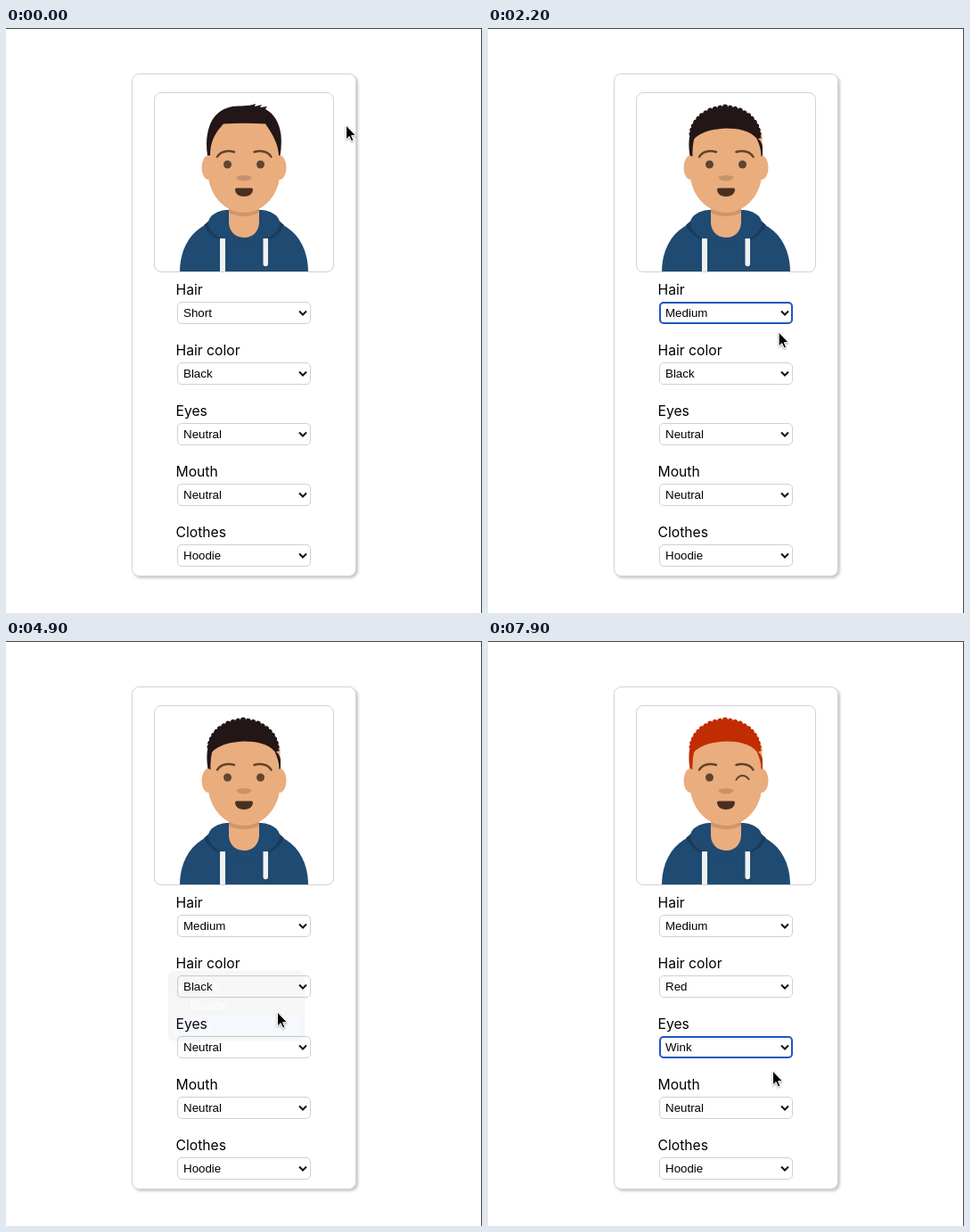
An HTML page for the animation above (8000 ms loop, 534 px wide and 656 px high).

```html
<!DOCTYPE html>
<html lang="en">
<head>
<meta charset="utf-8">
<title>Avatar editor</title>
<style>
  html, body { margin: 0; width: 100%; height: 100%; overflow: hidden; background: #fff; }
  svg { display: block; width: 534px; height: 656px; }
  .panel { fill: #fff; stroke: #d2d2d2; filter: drop-shadow(2px 2px 1.5px rgba(0, 0, 0, .22)); }
  .frame { fill: none; stroke: #d2d2d2; }
  .label { font: 15.7px Inter, "Open Sans", sans-serif; }
  .box { fill: #fff; stroke: #d0d0d0; }
  .ring { fill: none; stroke: #1f57c0; stroke-width: 2; }
  .value { font: 13.333px "Liberation Sans", Arial, sans-serif; }
  .chevron { fill: none; stroke: #111; stroke-width: 2; }
  .sheet { fill: #645f65; stroke: #2c292d; filter: drop-shadow(0 3px 5px rgba(0, 0, 0, .3)); }
  .rim { fill: none; stroke: #858086; }
  .hover { fill: #4a82ea; }
  .option { font: 500 13px Inter, "Open Sans", sans-serif; fill: #f0eef0; }
  .tick { fill: none; stroke: #f0eef0; stroke-width: 1.6; stroke-linecap: round; stroke-linejoin: round; }
  .skin { fill: #eaad7e; }
  .cloth { fill: #1f4a71; }
  .shade { fill: #193b5b; }
  .brow { fill: none; stroke: #60432b; stroke-width: 2.4; stroke-linecap: round; }
  .eye { fill: #5f4630; }
  #cursor { filter: drop-shadow(0 1px 1px rgba(0, 0, 0, .35)); }
</style>
</head>
<body>
<svg id="stage" viewBox="0 0 534 656">
  <defs><clipPath id="clip"><rect x="167" y="73" width="200" height="200" rx="7"/></clipPath></defs>
  <path d="M0 .5H534M533.5 0V656" stroke="#444" fill="none"/>
  <rect class="panel" x="141.5" y="51.5" width="251" height="563" rx="8"/>

  <g clip-path="url(#clip)">
    <path class="cloth" d="M195 274C195 245 209 225 232 217H302C325 225 339 245 339 274Z"/>
    <path class="shade" d="M222 221C227 232 238 239 250 240H284C296 239 307 232 312 221L304 214H230Z"/>
    <path class="cloth" d="M250 204C238 204 227 210 227 219C227 230 246 243 267 243S307 230 307 219C307 210 296 204 284 204Z"/>
    <path class="skin" d="M250 190H284V217C284 228 277 235 267 235S250 228 250 217Z"/>
    <path fill="#cd966d" d="M250 202H284V207C274 212.500 260 212.500 250 207Z"/>
    <path d="M240 236H246V274H240Z" fill="#f1f1f1"/>
    <path d="M288.500 236H294V264.500A2.750 2.750 0 0 1 288.500 264.500Z" fill="#f1f1f1"/>
    <ellipse class="skin" cx="227" cy="156.500" rx="7.500" ry="13.500"/>
    <ellipse class="skin" cx="307" cy="156.500" rx="7.500" ry="13.500"/>
    <path class="skin" d="M226.500 120C229 100 305 100 307.500 120V160C307.500 188 288 207 267 207S226.500 188 226.500 160Z"/>
    <path id="hair"/>
    <path class="brow" d="M237 144.500C240 139 248 136.500 256 139"/>
    <path class="brow" d="M297.500 144.500C294.500 139 286.500 136.500 278.500 139"/>
    <circle class="eye" cx="248.500" cy="153" r="4.500"/>
    <circle class="eye" id="eye" cx="285.500" cy="153" r="4.500"/>
    <path class="brow" id="wink" style="stroke-width:2" d="M278.500 155.500C282 149.500 289 149.500 292.500 155"/>
    <path fill="#c7926a" d="M258.500 167C262 164.800 272 164.800 275.500 167C274.500 173 259.500 173 258.500 167Z"/>
    <path fill="#49301f" d="M257 181Q257 179.500 258.500 179.500H275.500Q277 179.500 277 181C277 186 272.500 189 267 189S257 186 257 181Z"/>
  </g>
  <rect class="frame" x="166.500" y="72.500" width="201" height="201" rx="7.500"/>

  <g id="fields"></g>
  <g id="menu"></g>
  <path id="cursor" d="M.500 0V16L4.100 12.600L6.500 18L8.900 17L6.600 11.700H11.500Z" stroke="#fff" stroke-width="1"/>
</svg>
<script>
const LOOP = 8000, STEP = 100, ROW = 22;
const $ = id => document.getElementById(id);

function add(parent, tag, attrs, text) {
  const el = document.createElementNS('http://www.w3.org/2000/svg', tag);
  for (const k in attrs) el.setAttribute(k, attrs[k]);
  if (text) el.textContent = text;
  return parent.appendChild(el);
}

const fields = [
  ['Hair', 'Short'], ['Hair color', 'Black'], ['Eyes', 'Neutral'],
  ['Mouth', 'Neutral'], ['Clothes', 'Hoodie']
].map(([name, start], i) => {
  const g = add($('fields'), 'g', { transform: `translate(192 ${307 + 68 * i})` });
  add(g, 'text', { class: 'label', x: -1.5, y: -8.3 }, name);
  add(g, 'rect', { class: 'box', x: .5, y: .5, width: 149, height: 24, rx: 4.5 });
  const ring = add(g, 'rect', { class: 'ring', x: 1, y: 1, width: 148, height: 23, rx: 4 });
  const value = add(g, 'text', { class: 'value', x: 7, y: 17 }, start);
  add(g, 'path', { class: 'chevron', d: 'M137 10.500L141 14.500L145 10.500' });
  return { start, ring, value };
});

// Each menu opens over its field; the picked row blinks on click, then the menu fades.
const menus = [
  { options: ['Short', 'Medium', 'Long'], open: 800, click: 1800, pick: 1 },
  { options: ['Black', 'Blonde', 'Red'], open: 3500, click: 4600, pick: 2 },
  { options: ['Neutral', 'Close', 'Wink'], open: 6000, click: 7300, pick: 2 }
];
menus.forEach((m, i) => {
  m.top = 302 + 68 * i;
  m.g = add($('menu'), 'g', { transform: `translate(182 ${m.top})` });
  add(m.g, 'rect', { class: 'sheet', x: .5, y: .5, width: 152, height: 77, rx: 5.5 });
  add(m.g, 'rect', { class: 'rim', x: 1.5, y: 1.5, width: 150, height: 75, rx: 4.5 });
  m.hover = add(m.g, 'rect', { class: 'hover', x: 6, width: 141, height: ROW, rx: 4 });
  add(m.g, 'path', { class: 'tick', d: 'M11 18L14 21.500L19 13.500' });
  m.options.forEach((o, r) => add(m.g, 'text', { class: 'option', x: 24, y: 22 + ROW * r }, o));
});

// Pointer stops: time, x, y
const track = [
  [0, 381, 109], [100, 383, 114], [300, 392, 160], [500, 372, 250], [700, 331, 317],
  [1100, 331, 317], [1400, 307, 339], [2000, 307, 339], [2300, 335, 342], [2600, 368, 346],
  [2800, 376, 352], [3000, 357, 358], [3300, 328, 380], [3700, 326, 382], [4000, 319, 395],
  [4400, 309, 422], [4700, 309, 422], [4900, 304, 416], [5200, 330, 420], [5500, 344, 432],
  [5900, 328, 445], [6500, 328, 445], [7100, 316, 490], [7500, 316, 490], [7900, 319, 482]
];

function pointer(t) {
  const i = track.findIndex(p => p[0] > t);
  if (i < 0) return track[track.length - 1].slice(1);
  const [a, b] = [track[i - 1], track[i]];
  const k = (t - a[0]) / (b[0] - a[0]);
  return [a[1] + (b[1] - a[1]) * k, a[2] + (b[2] - a[2]) * k];
}

function curls() {
  let d = 'M229.500 144L226.500 143Q224.500 132 226 122';
  const n = 21;
  for (let i = 0; i <= n; i++) {
    const a = Math.PI * (1 + i / n);
    const x = 266 + 39.5 * Math.cos(a), y = 121 + 32.5 * Math.sin(a);
    d += `A3 3 0 0 1 ${x.toFixed(1)} ${y.toFixed(1)}`;
  }
  return d + 'L307 123L302 124.500C294 115 281 112.500 267 112.500C251 113 236 118 231 125Q229 134 229.500 144Z' +
    'M301 123Q307 126 308 133L308 143L306.500 144Q306.500 134 301 123Z';
}

const cuts = {
  Short: 'M229 143L226 143C224 130 225 118 229 108C233 98 240 92 250 89C259 86 270 89 280 85' +
    'L279 88L287 86L285 89L293 88L291 91C301 96 307 107 308.500 120Q309.500 132 307.500 143L306 143' +
    'C305.500 130 299 119 291 107.500Q267 106 244 107.500C234 118 229 128 229 143Z',
  Medium: curls()
};
const dyes = { Black: '#231616', Red: '#c22c02' };
const show = (el, on) => { el.style.display = on ? '' : 'none'; };

function draw(t) {
  const [x, y] = pointer(t);
  $('cursor').setAttribute('transform', `translate(${x} ${y})`);
  const values = fields.map(f => f.start);

  menus.forEach((m, i) => {
    const since = t - m.click, done = since >= 300 + STEP;
    if (done) values[i] = m.options[m.pick];
    const next = menus[i + 1];
    show(fields[i].ring, done && !(next && t >= next.open));
    show(m.g, t >= m.open && !done);
    m.g.setAttribute('opacity', since < 200 ? 1 : since < 300 ? .5 : .05);
    const row = since >= 0 ? m.pick : Math.floor((y - m.top - 6) / ROW);
    m.hover.setAttribute('y', 6 + ROW * Math.max(0, Math.min(2, row)));
    show(m.hover, since < 0 || since >= STEP);
  });

  fields.forEach((f, i) => {
    f.value.textContent = values[i];
    if (i >= menus.length) show(f.ring, false);
  });
  $('hair').setAttribute('d', cuts[values[0]]);
  $('hair').setAttribute('fill', dyes[values[1]]);
  show($('eye'), values[2] === 'Neutral');
  show($('wink'), values[2] === 'Wink');
}

const begin = performance.now();
function tick() {
  const t = (performance.now() - begin) % LOOP;
  draw(Math.floor(t / STEP) * STEP);
  requestAnimationFrame(tick);
}
tick();
</script>
</body>
</html>
```
